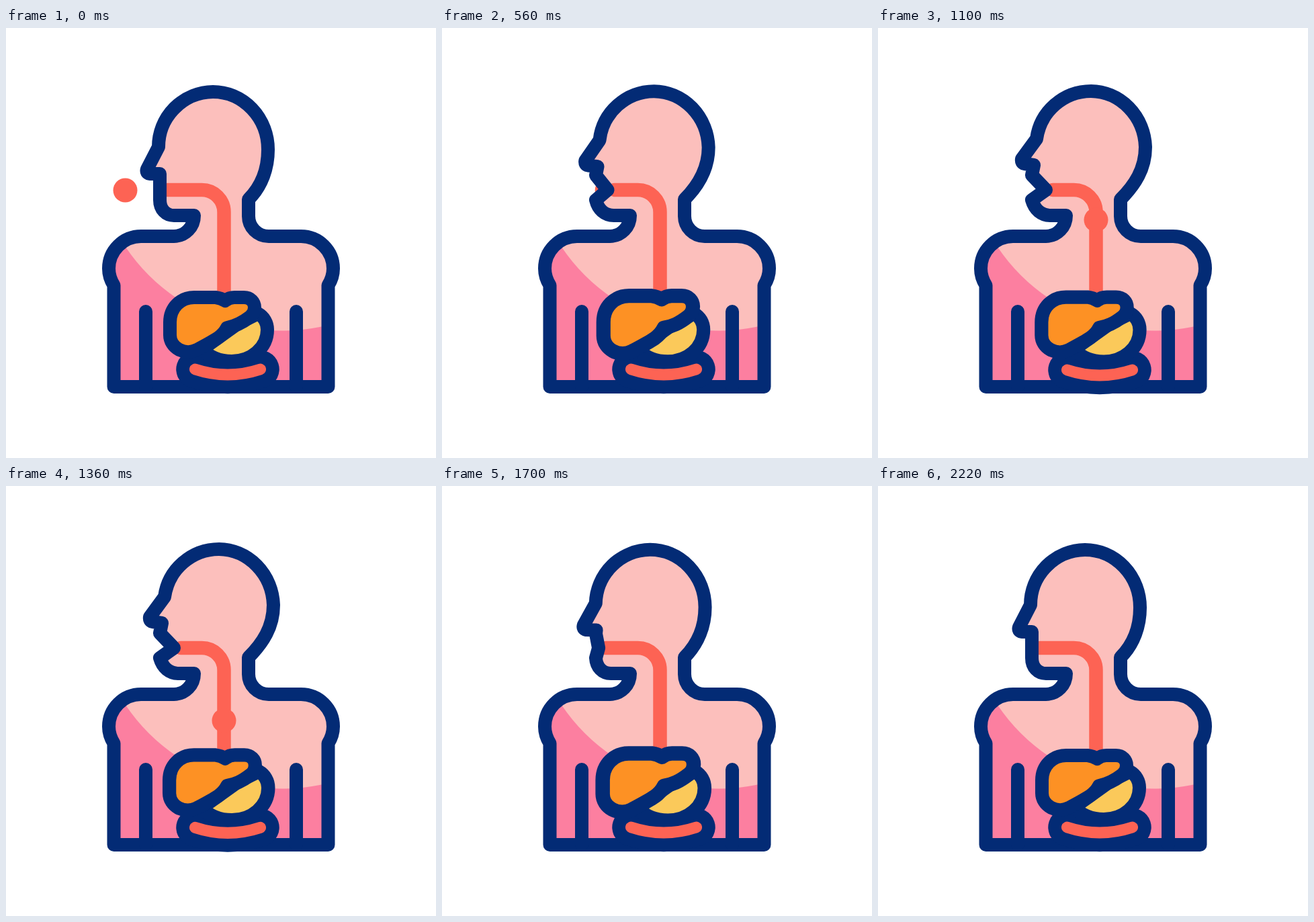
Write an HTML page that moves like this. It is 640 px wide and 640 px high and loops after 2.4 s.

```html
<!DOCTYPE html>
<html lang="en">
<head>
<meta charset="utf-8">
<title>Digestion</title>
<style>
  html, body { margin: 0; width: 100%; height: 100%; overflow: hidden; background: #fff; }
  svg { display: block; width: 100vw; height: 100vh; }
  .line { fill: none; stroke: #032b75; stroke-width: 20; stroke-linecap: round; stroke-linejoin: round; }
  .food { fill: #fd6354; }
  .tract { fill: none; stroke: #fd6354; stroke-linecap: round; }
</style>
</head>
<body>
<svg viewBox="0 0 640 640">
  <defs>
    <clipPath id="inside"><path class="body"/></clipPath>
  </defs>
  <circle id="bite" class="food" cy="241.5" r="18"/>
  <path class="body" fill="#fc7fa0"/>
  <g clip-path="url(#inside)">
    <circle cx="412" cy="168.5" r="282" fill="#fcbfbc"/>
    <path id="gullet" class="tract" stroke-width="20.5"/>
    <circle id="bolus" class="food" r="18"/>
  </g>
  <path class="body line"/>
  <path class="line" d="M208 422V534M432 422V534"/>
  <path class="gut line" style="stroke-width:56.500px"/>
  <path id="stomach" class="line" style="fill:#fbc95a"
    d="M375 425C384 430 389 439 389 449C389 476 365 496 336 496C318 496 303 490 292 478L345 440Z"/>
  <path class="gut tract" stroke-width="17"/>
  <path id="liver" class="line" style="fill:#fd9124"
    d="M280 401H312Q320 402 326 406Q332 401 340 401H354C364 401 370 408 370 416Q370 425 363 430C350 440 341 444 329 446C323 458 316 462 284 479C266 488 244 476 244 457V438C244 416 260 401 280 401Z"/>
</svg>
<script>
  const LOOP = 2400;
  const $ = id => document.getElementById(id);
  const setAll = (cls, d) =>
    document.querySelectorAll(cls).forEach(el => el.setAttribute('d', d));

  const progress = (t, from, to) => Math.min(1, Math.max(0, (t - from) / (to - from)));
  const ease = p => p * p * (3 - 2 * p);
  const pulse = (t, from, to, beats) =>
    (1 - Math.cos(2 * Math.PI * beats * progress(t, from, to))) / 2;

  // Each point rests at x, y and shifts by dx, dy as the mouth opens.
  function bodyPath(open) {
    const p = (x, y, dx = 0, dy = 0) => `${x + dx * open} ${y + dy * open} `;
    const skull = 'C' + p(381, 235, 1, -1) + p(390, 208, 8, 2) + p(390, 181, 8, -4) +
      'A82 86 0 0 0 ' + p(308, 95, 9, -1) + 'A82 82 0 0 0 ' + p(227, 177, 9, -12);
    const nose = 'L' + p(210, 210, 4, -15) + 'Q' + p(208, 216, 5, -15) + p(214, 217, 4, -15);
    const lips = 'L' + p(229, 217, 3, -13) + p(229, 220, 0, -1) + p(229, 241, 21) + p(229, 256);
    const jaw = 'C' + p(229, 270, 4) + p(238, 279, 5) + p(250, 279, 7) + 'L280 279';
    return 'M160.500 534H479.500V383Q487 371 487 358A48 48 0 0 0 439 310H391A30 30 0 0 1 361 280V255' +
      skull + nose + lips + jaw +
      'A30 31 0 0 1 250 310H201A48 48 0 0 0 153 358Q153 371 160.500 383Z';
  }

  // Position at a distance along the gullet, counted from x = 0.
  function along(d) {
    const r = 33, bend = 291.5, arc = r * Math.PI / 2;
    if (d < bend) return [d, 241];
    const a = Math.min((d - bend) / r, Math.PI / 2);
    return [bend + r * Math.sin(a), 241 + r * (1 - Math.cos(a)) + Math.max(0, d - bend - arc)];
  }

  function grow(id, x, y, k) {
    $(id).setAttribute('transform', `translate(${x} ${y}) scale(${k}) translate(${-x} ${-y})`);
  }

  function place(id, [x, y], visible) {
    $(id).setAttribute('cx', x);
    $(id).setAttribute('cy', y);
    $(id).style.display = visible ? '' : 'none';
  }

  function draw(t) {
    const mouth = ease(progress(t, 220, 680)) - ease(progress(t, 1400, 1820));
    setAll('.body', bodyPath(mouth));
    $('gullet').setAttribute('d', `M${240 + 20 * mouth} 241H291.500A33 33 0 0 1 324.500 274V410`);

    // The bite slips behind the face while the bolus sets off inside it.
    place('bite', [177.5 + 0.2 * Math.max(0, t - 220), 241.5], t < 720);
    place('bolus', along(301 + 0.244 * (t - 880)), t >= 640 && t < 1680);

    grow('liver', 309, 441, 1 + 0.075 * pulse(t, 220, 2220, 2));
    grow('stomach', 330, 435, 1 + 0.05 * pulse(t, 500, 1900, 2));
    const sag = 508 + pulse(t, 700, 1540, 1);
    setAll('.gut', `M281.500 ${sag}Q330 ${sag + 16} 378.500 ${sag}`);
  }

  const start = performance.now();
  function frame() {
    draw((performance.now() - start) % LOOP);
    requestAnimationFrame(frame);
  }
  frame();
</script>
</body>
</html>
```
